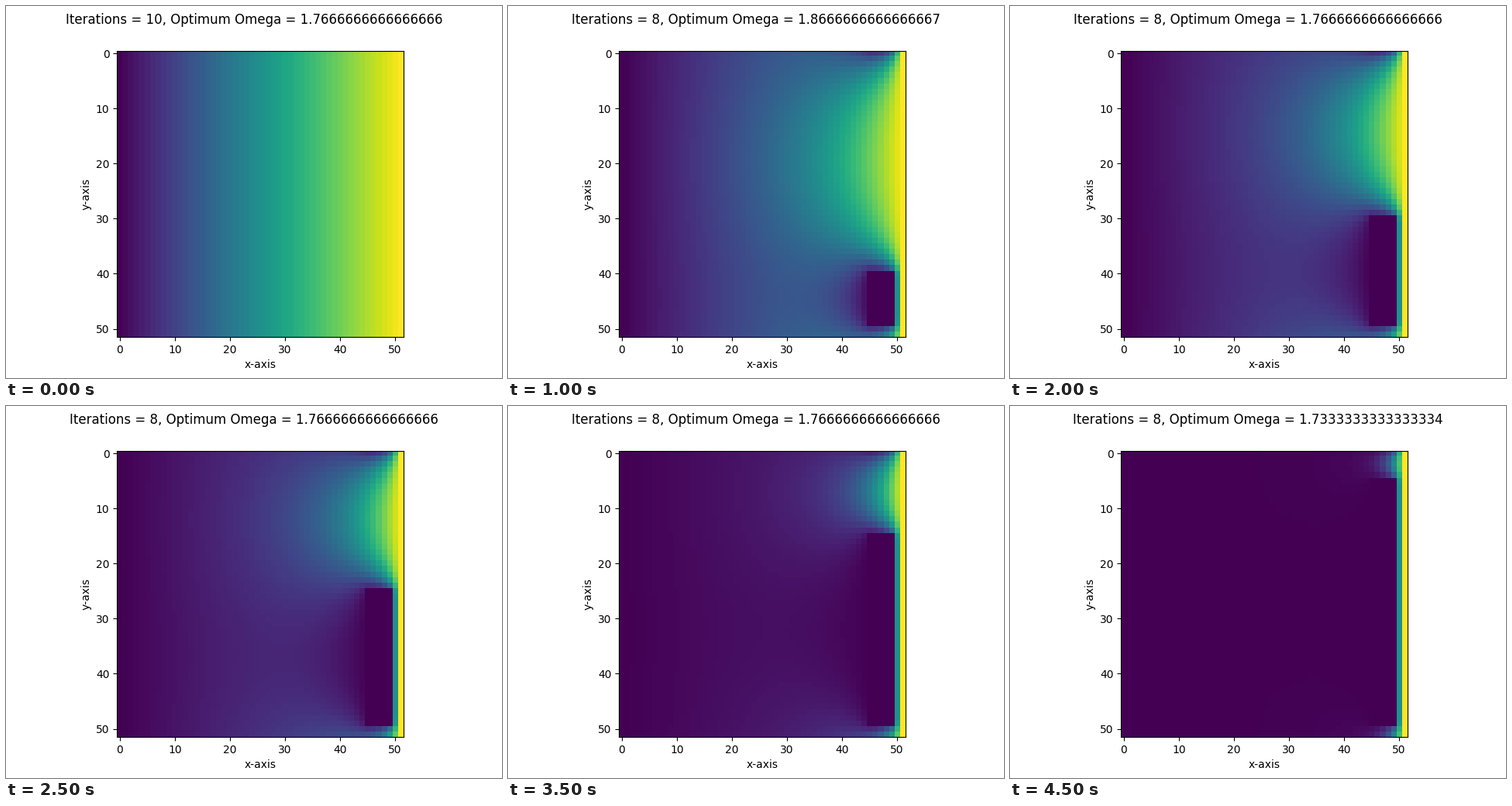
These frames come from a looping animation (640 by 480 pixels, 5 s). A matplotlib script:

```python
import numpy as np
import matplotlib.pyplot as plt
from matplotlib.animation import FuncAnimation

N = 50          # free cells per side; a border row or column lies on each edge
SINK_COLS = slice(45, 50)
SINK_STEP = 5   # rows the sink grows by per step
STEPS = 10
INTERVAL = 500

# Relaxation factor as a rung of 1/30 above 1.7, held from the given step on
RUNGS = {0: 2, 1: 5, 3: 6, 4: 2, 8: 3, 9: 1}


def omega_at(k):
    rung = RUNGS[max(start for start in RUNGS if start <= k)]
    return (51 + rung) / 30


def iterations_at(k):
    return max(8, 10 - k)


def wrap(c):
    """Make the field periodic in y through its two border rows."""
    c[0] = c[N]
    c[N + 1] = c[1]


def solve(height, omega=1.9, sweeps=400):
    """Steady diffusion from c=0 (left) to c=1 (right) around a sink."""
    c = np.tile(np.linspace(0, 1, N + 2), (N + 2, 1))
    free = np.ones_like(c, dtype=bool)
    sink = (slice(N - height, N), SINK_COLS)
    c[sink] = 0
    free[sink] = False
    parity = np.indices((N, N)).sum(axis=0) % 2
    inner = c[1:-1, 1:-1]
    masks = [omega * (free[1:-1, 1:-1] & (parity == p)) for p in (0, 1)]
    wrap(c)
    for _ in range(sweeps):
        for mask in masks:
            mean = (c[:-2, 1:-1] + c[2:, 1:-1] + c[1:-1, :-2] + c[1:-1, 2:]) / 4
            inner += mask * (mean - inner)
            wrap(c)
    return c


fields = [solve(SINK_STEP * k) for k in range(STEPS)]

plt.rcParams["text.kerning_factor"] = 6   # kerning in whole pixels
fig, ax = plt.subplots(figsize=(6.4, 4.8), dpi=100)
image = ax.imshow(fields[0], cmap="viridis", vmin=0, vmax=1)
ax.set_xlabel("x-axis")
ax.set_ylabel("y-axis")
title = fig.suptitle("", y=0.982)


def update(k):
    image.set_data(fields[k])
    title.set_text(f"Iterations = {iterations_at(k)}, "
                   f"Optimum Omega = {omega_at(k)}")
    return image, title


anim = FuncAnimation(fig, update, frames=STEPS, init_func=lambda: update(0),
                     interval=INTERVAL, repeat=True, repeat_delay=0)
plt.show()
```
